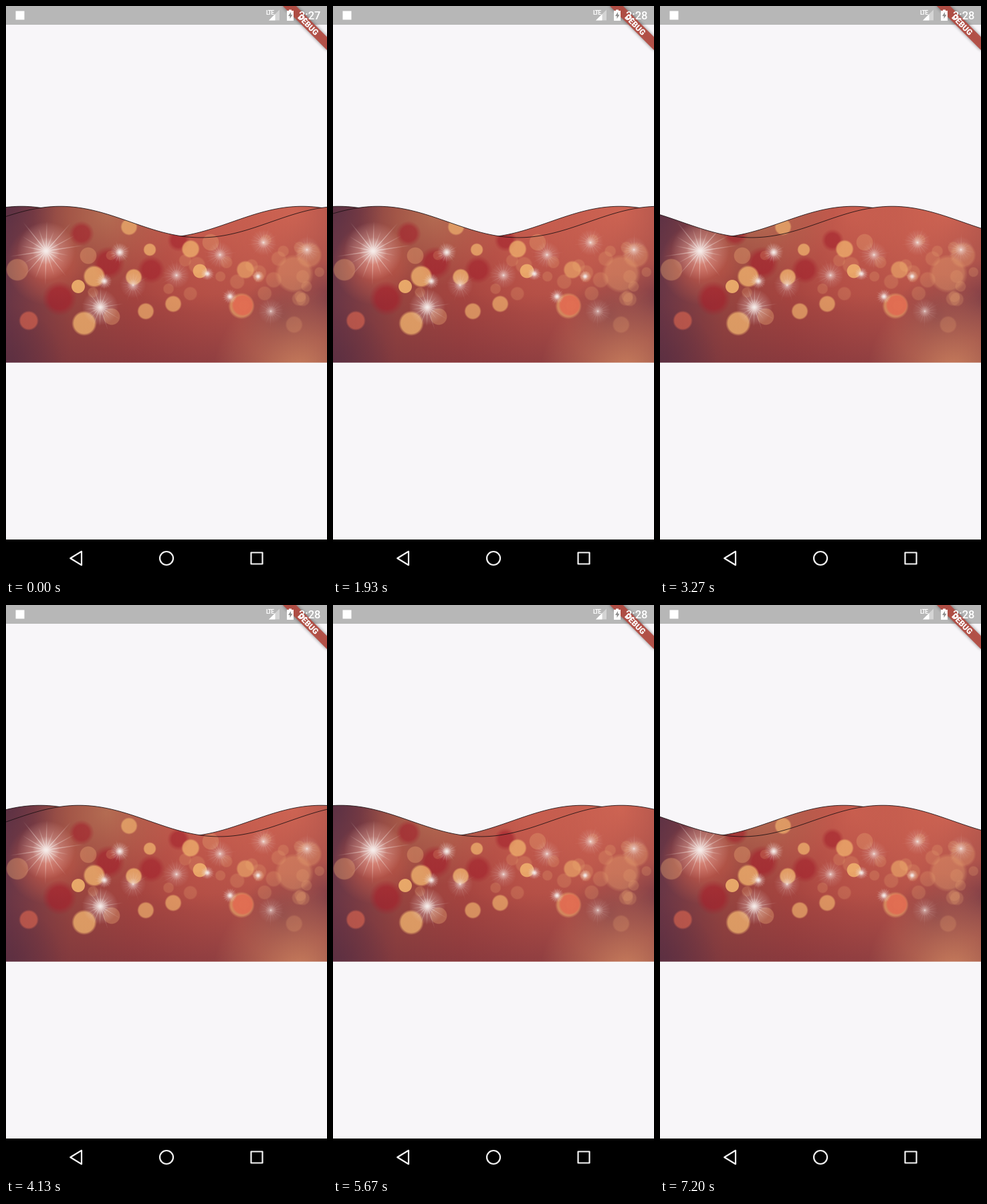
Write an HTML page with a canvas that moves like this. It is 480 px wide and 853 px high and loops after 7.27 s.

```html
<!DOCTYPE html>
<html lang="en">
<head>
<meta charset="utf-8">
<title>Wave</title>
<style>
  html, body { margin: 0; width: 100%; height: 100%; overflow: hidden; background: #f8f6f9; }
  canvas, svg { position: absolute; left: 0; top: 0; display: block; }
  text { font-family: Roboto, sans-serif; fill: #fff; }
</style>
</head>
<body>
<canvas id="stage" width="480" height="853"></canvas>
<svg width="480" height="853" viewBox="0 0 480 853">
  <defs>
    <filter id="soft" x="-20%" y="-80%" width="140%" height="260%"><feGaussianBlur stdDeviation="2.6"/></filter>
  </defs>
  <rect width="480" height="28" fill="#b7b7b7"/>

  <!-- corner ribbon -->
  <g transform="translate(480 0) rotate(45)">
    <rect x="-46.7" y="32.7" width="93.4" height="14" opacity=".45" filter="url(#soft)"/>
    <rect x="-46.7" y="32.7" width="93.4" height="14" fill="#b54b42" fill-opacity=".92"/>
    <text y="43.9" font-size="11.9" font-weight="900" text-anchor="middle">DEBUG</text>
  </g>

  <!-- status bar -->
  <rect x="14.5" y="7.5" width="13" height="13" fill="#fff"/>
  <text x="389" y="13" font-size="8.5" font-weight="700" letter-spacing="-.9">LTE</text>
  <path d="M393 21.5L409 5.5V21.5Z" fill="#fff" opacity=".4"/>
  <path d="M393 21.5L402.5 12V21.5Z" fill="#fff"/>
  <path d="M420 7h3V5.5h4V7h3V22h-10Z" fill="#fff"/>
  <path d="M426 9l-4 6h2.5v4l4-6h-2.5Z" fill="#8f8f8f"/>
  <text id="clock" x="470.5" y="20" font-size="16.5" font-weight="500" text-anchor="end">3:27</text>

  <!-- navigation bar -->
  <rect y="797" width="480" height="56"/>
  <g fill="none" stroke="#f4f4f4" stroke-width="2.2" stroke-linejoin="round">
    <path d="M96.2 825L113 814.8V835.2Z"/>
    <circle cx="240" cy="825" r="10"/>
    <rect x="366.5" y="816.5" width="17" height="17"/>
  </g>
</svg>
<script>
const LOOP = 7270, STEP = 1000 / 15, CLOCK_TURN = 1730;
const W = 480, MID = 322.6, AMP = 23.33, BOTTOM = 532.5;
const PERIOD = 420, CYCLE = 2000, GAP = 58.3, START = 52;

const GOLD = '244,184,112', PEACH = '230,162,112', CORAL = '226,104,80', RED = '163,32,44';
const DUSK = '84,46,66', PLUM = '112,56,70', TAN = '190,128,92', ROSE = '216,106,86';

const stage = document.getElementById('stage').getContext('2d');
const clock = document.getElementById('clock');

function paintPicture() {
  const canvas = document.createElement('canvas');
  canvas.width = W;
  canvas.height = 540;
  const c = canvas.getContext('2d');
  let seed = 7;
  const random = () => (seed = seed * 16807 % 2147483647) / 2147483647;

  function fill(gradient, ...colors) {
    colors.forEach((color, i) => gradient.addColorStop(i / (colors.length - 1), color));
    c.fillStyle = gradient;
    c.fillRect(0, 290, W, 250);
  }

  // A disc that is even up to the given share of its radius, then fades out
  function disc(x, y, r, rgb, alpha, solid = .8) {
    const g = c.createRadialGradient(x, y, 0, x, y, r);
    g.addColorStop(solid, `rgba(${rgb},${alpha})`);
    g.addColorStop((1 + solid) / 2, `rgba(${rgb},${alpha * .45})`);
    g.addColorStop(1, `rgba(${rgb},0)`);
    c.fillStyle = g;
    c.beginPath();
    c.arc(x, y, r, 0, 7);
    c.fill();
  }

  const glow = (x, y, r, rgb, alpha) => disc(x, y, r, rgb, alpha, 0);

  function star(x, y, r, alpha) {
    glow(x, y, r * .75, '240,225,222', alpha * .6);
    glow(x, y, r * .35, '250,242,240', alpha * .8);
    c.lineWidth = Math.max(.6, r * .022);
    for (let a = .2; a < 6.4; a += Math.PI / 9) {
      const len = r * (.55 + .45 * random());
      const ex = x + Math.cos(a) * len, ey = y + Math.sin(a) * len;
      const g = c.createLinearGradient(x, y, ex, ey);
      g.addColorStop(0, `rgba(245,235,232,${alpha * .8})`);
      g.addColorStop(1, 'rgba(245,225,215,0)');
      c.strokeStyle = g;
      c.beginPath();
      c.moveTo(x, y);
      c.lineTo(ex, ey);
      c.stroke();
    }
  }

  // Backdrop
  fill(c.createLinearGradient(0, 0, W, 0), '#683646', '#98453f', '#a5443f', '#b04c44', '#b45248', '#a04c48');
  fill(c.createLinearGradient(0, 430, 0, 532), 'rgba(105,45,60,0)', 'rgba(105,45,60,.45)');
  glow(290, 310, 150, ROSE, .6);
  glow(430, 305, 140, ROSE, .75);
  glow(150, 310, 110, TAN, .65);
  glow(0, 300, 75, DUSK, .6);
  glow(0, 532, 85, DUSK, .6);
  glow(415, 465, 65, PLUM, .6);
  glow(485, 440, 60, PLUM, .7);
  glow(440, 550, 130, '208,134,96', .9);
  glow(62, 385, 62, CORAL, .75);

  // Dark red spots
  disc(113, 340, 19, RED, .6, .6);
  disc(153, 384, 25, RED, .65, .6);
  disc(80, 437, 26, RED, .65, .6);
  disc(217, 394, 21, RED, .6, .6);
  disc(258, 350, 17, RED, .6, .6);

  // Faint lights scattered through the middle band
  for (let i = 0; i < 26; i++) {
    const x = 130 + 340 * random(), y = 410 + 85 * (random() + random() - 1);
    disc(x, y, 7 + 7 * random(), PEACH, .25);
  }

  // Large lights
  disc(17, 394, 17, PEACH, .4, .9);
  disc(123, 373, 13, PEACH, .4, .9);
  disc(158, 464, 13, PEACH, .4, .9);
  disc(306, 353, 13, PEACH, .35, .9);
  disc(431, 400, 29, PEACH, .4);
  disc(453, 372, 20, PEACH, .35);
  disc(34, 470, 15, CORAL, .6);
  disc(117, 474, 19, GOLD, .75);
  disc(132, 404, 17, GOLD, .75);
  disc(184, 330, 13, GOLD, .65);
  disc(191, 405, 13, GOLD, .75);
  disc(209, 456, 13, GOLD, .65);
  disc(250, 445, 13, GOLD, .65);
  disc(276, 363, 14, GOLD, .7);
  disc(215, 364, 10, GOLD, .7);
  disc(358, 394, 14, GOLD, .55);
  disc(108, 419, 10.5, GOLD, .85, .9);
  disc(290, 396, 11, GOLD, .8, .9);
  disc(352, 448, 20, GOLD, .55);
  disc(354, 447, 17, CORAL, .85);

  // Bright stars, then a wavy row of hazy ones
  star(60, 366, 58, .95);
  star(141, 450, 36, 1);
  star(170, 368, 19, 1);
  star(147, 411, 15, 1);
  star(301, 400, 13, 1);
  star(335, 434, 14, 1);
  star(377, 404, 11, 1);
  for (let i = 0; i < 5; i++) star(190 + 65 * i, 385 + 32 * Math.cos(i), 26, .5);
  star(396, 456, 25, .4);
  return canvas;
}

const picture = paintPicture();

function drawWave(peak) {
  const line = new Path2D();
  for (let x = -2; x <= W + 2; x++) {
    line.lineTo(x, MID - AMP * Math.cos((x - peak) / PERIOD * 2 * Math.PI));
  }
  const body = new Path2D(line);
  body.lineTo(W + 2, BOTTOM);
  body.lineTo(-2, BOTTOM);
  body.closePath();
  stage.save();
  stage.clip(body);
  stage.drawImage(picture, 0, 0);
  stage.restore();
  stage.stroke(line);
}

function draw() {
  const now = performance.now() % LOOP;
  const t = Math.floor((now + 4) / STEP) * STEP;
  const crest = START + t / CYCLE * PERIOD;
  stage.fillStyle = '#f8f6f9';
  stage.fillRect(0, 0, W, 853);
  stage.strokeStyle = '#1a1012';
  stage.lineWidth = .85;
  drawWave(crest - GAP / 2);
  drawWave(crest + GAP / 2);
  clock.textContent = t < CLOCK_TURN ? '3:27' : '3:28';
  requestAnimationFrame(draw);
}
draw();
</script>
</body>
</html>
```
